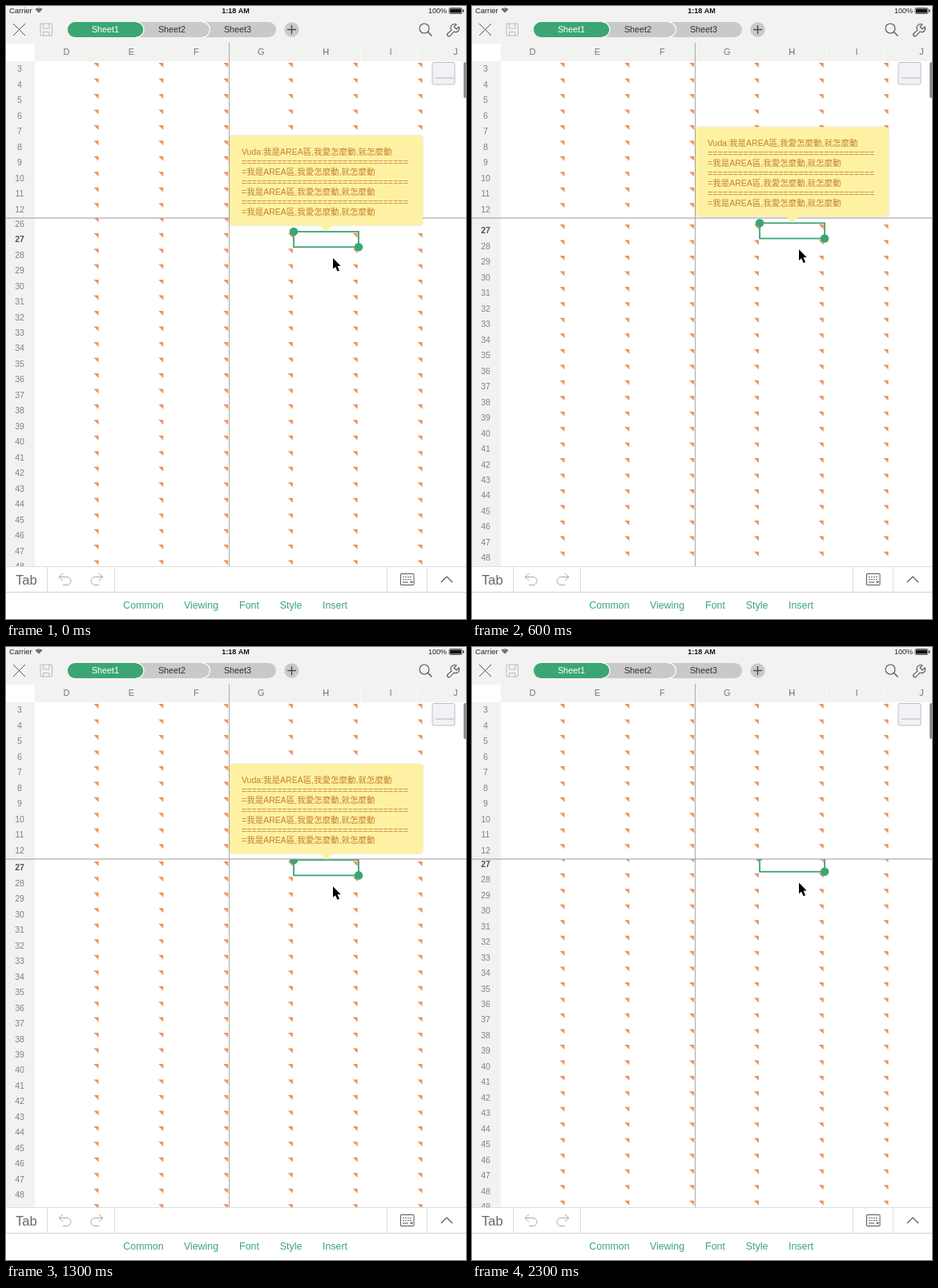
Animation, 574 px wide and 766 px high, one loop 2.4 s. Source, as an HTML page with a canvas:

```html
<!DOCTYPE html>
<html lang="zh-Hant">
<head>
<meta charset="utf-8">
<title>Spreadsheet</title>
<style>
html, body { margin: 0; width: 100%; height: 100%; overflow: hidden; background: #fff; }
canvas { display: block; }
</style>
</head>
<body>
<canvas id="stage" width="574" height="766"></canvas>
<script>
const ctx = document.getElementById('stage').getContext('2d');
const W = 574, LOOP = 2400, STEP = 100;
const PITCH = 19.47, TOP = 69.3, SPLIT = 265, BOTTOM = 700;
const GREEN = '#3ba674', BAR = '#f2f2f1', ORANGE = '#ef915c';
const FONT = '"Liberation Sans", "Noto Sans CJK TC", "Noto Sans CJK", sans-serif';

// [time, top edge of row 27]
const SCROLL = [[0, 282], [200, 279.8], [600, 271.3], [1000, 267.6],
  [1200, 266.2], [1400, 266.2], [2000, 261.6], [LOOP, 261.6]];

const COLUMNS = [...'DEFGHIJ'].map((name, i) => ({ name, x: 75.5 + i * 80.9, right: 115.5 + i * 80.8 }));

function rowTop(t) {
  const i = SCROLL.findIndex(p => p[0] > t);
  const [t0, y0] = SCROLL[i - 1], [t1, y1] = SCROLL[i];
  return y0 + (y1 - y0) * (t - t0) / (t1 - t0);
}

// The note swells a little, then collapses.
function noteScale(t) {
  const p = Math.max(0, (t - 1400) / 413);
  return p >= 1 ? 0 : 1 - (2.70158 * p ** 3 - 1.70158 * p ** 2);
}

function rect(x, y, w, h, color) {
  ctx.fillStyle = color;
  ctx.fillRect(x, y, w, h);
}

function text(s, x, y, size, color, align = 'center', weight = 'normal') {
  ctx.font = `${weight} ${size}px ${FONT}`;
  ctx.textAlign = align;
  ctx.textBaseline = 'alphabetic';
  ctx.fillStyle = color;
  ctx.fillText(s, x, y + size * 0.36);
}

function line(points, color, width = 1) {
  ctx.beginPath();
  points.forEach(([x, y]) => ctx.lineTo(x, y));
  ctx.strokeStyle = color;
  ctx.lineWidth = width;
  ctx.stroke();
}

function poly(points, color) {
  ctx.beginPath();
  points.forEach(([x, y]) => ctx.lineTo(x, y));
  ctx.closePath();
  ctx.fillStyle = color;
  ctx.fill();
}

function round(x, y, w, h, r, color) {
  ctx.beginPath();
  ctx.roundRect(x, y, w, h, r);
  ctx.fillStyle = color;
  ctx.fill();
}

function strokeRound(x, y, w, h, r, color, width = 1) {
  ctx.beginPath();
  ctx.roundRect(x, y, w, h, r);
  ctx.strokeStyle = color;
  ctx.lineWidth = width;
  ctx.stroke();
}

function disc(x, y, r, color) {
  ctx.beginPath();
  ctx.arc(x, y, r, 0, 7);
  ctx.fillStyle = color;
  ctx.fill();
}

function arc(x, y, r, a, b, color, width = 1) {
  ctx.beginPath();
  ctx.arc(x, y, r, a, b);
  ctx.strokeStyle = color;
  ctx.lineWidth = width;
  ctx.stroke();
}

function clipped(y, h, draw) {
  ctx.save();
  ctx.beginPath();
  ctx.rect(0, y, W, h);
  ctx.clip();
  draw();
  ctx.restore();
}

function row(n, y) {
  const active = n === 27;
  text(n, 17, y + 9.4, 10.5, active ? '#555' : '#808080', 'center', active ? 'bold' : 'normal');
  for (const { right } of COLUMNS.slice(0, 6)) {
    poly([[right - 6, y + 1.7], [right, y + 1.7], [right, y + 7.7]], ORANGE);
  }
}

function selection(y) {
  ctx.strokeStyle = GREEN;
  ctx.lineWidth = 1.8;
  ctx.strokeRect(359, y, 81, 19.2);
  disc(359, y, 5.3, GREEN);
  disc(440, y + 19.2, 5.3, GREEN);
}

function grid(y) {
  rect(0, 46, 36, 654, BAR);
  clipped(69, SPLIT - 69, () => {
    for (let n = 3; n <= 12; n++) row(n, TOP + (n - 3) * PITCH);
  });
  clipped(SPLIT, BOTTOM - SPLIT, () => {
    for (let n = 26; n <= 49; n++) row(n, y + (n - 27) * PITCH);
    selection(y);
  });
}

function header() {
  rect(0, 0, W, 69, BAR);
  rect(0, 47, 36, 22, '#fff');
  for (const { name, x } of COLUMNS) text(name, x, 57.5, 11, name === 'H' ? '#666' : '#777');
  rect(442, 47, 1, 22, '#fafafa');
  rect(513, 47, 1, 22, '#fafafa');
  rect(278, 46, 1, 654, '#aaa');
  rect(0, 264.5, W, 1, '#999');
}

function statusBar() {
  text('Carrier', 4, 6, 9.4, '#222', 'left');
  for (const r of [2, 4, 6]) arc(41, 9, r, -2.3, -0.84, '#222', 1.2);
  text('1:18 AM', 286.5, 6, 9, '#111', 'center', 'bold');
  text('100%', 550, 6, 9, '#222', 'right');
  strokeRound(553, 2.5, 16, 7, 1.5, '#333', 0.8);
  rect(554, 3.5, 14, 5, '#111');
  rect(570, 4.5, 1.5, 3, '#333');
}

function toolbar() {
  line([[9, 22], [24, 37]], '#555');
  line([[24, 22], [9, 37]], '#555');

  strokeRound(43, 22, 14.5, 15, 1, '#bbb');
  line([[46.5, 22], [46.5, 28], [54, 28], [54, 22]], '#bbb');
  line([[46.5, 37], [46.5, 32.5], [54, 32.5], [54, 37]], '#bbb');

  round(77, 20, 260, 19, 9.5, '#c9c9c9');
  round(166, 20, 89, 19, [0, 9.5, 9.5, 0], '#c9c9c9');
  arc(245, 29.5, 9.5, -1.57, 1.57, '#fff', 1.2);
  round(77, 20, 95, 19, 9.5, GREEN);
  arc(162.5, 29.5, 9.5, -1.57, 1.57, '#fff', 1.2);
  text('Sheet1', 124, 29.5, 10.8, '#fff');
  text('Sheet2', 207, 29.5, 10.8, '#333');
  text('Sheet3', 289, 29.5, 10.8, '#333');

  disc(356.5, 29.5, 9.2, '#c9c9c9');
  line([[351, 29.5], [362, 29.5]], '#444', 1.3);
  line([[356.5, 24], [356.5, 35]], '#444', 1.3);

  arc(522, 28, 6, 0, 7, '#555', 1.1);
  line([[526.3, 32.3], [531.5, 37.5]], '#555', 1.3);

  ctx.beginPath();
  ctx.moveTo(562, 23);
  ctx.bezierCurveTo(557, 21, 553, 26, 556, 30);
  ctx.lineTo(550.5, 35);
  ctx.quadraticCurveTo(550.5, 38, 553.5, 38);
  ctx.lineTo(559, 32);
  ctx.bezierCurveTo(563, 34, 567, 30, 565, 26);
  ctx.lineTo(562, 29);
  ctx.lineTo(559, 26);
  ctx.closePath();
  ctx.strokeStyle = '#555';
  ctx.lineWidth = 1.1;
  ctx.stroke();
}

function arrow(x, dir) {
  ctx.save();
  ctx.translate(x, 717);
  ctx.scale(dir, 1);
  line([[-3, -8], [-8, -3.5], [-3, 1]], '#aaa');
  line([[-8, -3.5], [2, -3.5]], '#aaa');
  arc(2, 1.5, 5, -1.57, 1.57, '#aaa');
  line([[2, 6.5], [-3, 6.5]], '#aaa');
  ctx.restore();
}

function footer() {
  rect(0, BOTTOM, W, 66, '#fff');
  rect(0, 700, W, 1, '#dedede');
  rect(0, 732, W, 1, '#d2d2d2');
  for (const x of [51, 135, 475, 525]) rect(x, 701, 1, 31, '#dcdcdc');
  text('Tab', 12, 717, 16.5, '#666', 'left');
  arrow(74, 1);
  arrow(113, -1);

  strokeRound(492.5, 709.5, 16.5, 14, 0.5, '#555');
  for (const y of [713, 716]) {
    for (let x = 495; x < 507; x += 3) rect(x, y, 1.8, 1, '#555');
  }
  rect(495, 719.5, 7, 1, '#555');
  poly([[504, 719], [508, 719], [506, 721.5]], '#555');
  line([[543, 720], [550, 713], [557, 720]], '#555', 1.2);

  const menu = { Common: 171.5, Viewing: 243.5, Font: 303.5, Style: 355.5, Insert: 410.5 };
  for (const name in menu) text(name, menu[name], 749, 12.4, GREEN);
}

function sideView() {
  round(532, 70.5, 28, 27.5, 2, '#f1f2f5');
  strokeRound(532, 70.5, 28, 27.5, 2, '#b9bfcd');
  rect(536, 89.5, 23, 1, '#b5b5b5');
  round(571, 70, 4, 45, 2, '#8f8f8f');
}

function note(y, scale) {
  if (scale <= 0) return;
  const body = '我是AREA區,我愛怎麼動,就怎麼動';
  const ink = '#c2802f';
  ctx.save();
  ctx.translate(399.5, y);
  ctx.scale(scale, scale);
  ctx.translate(-399.5, -120);
  strokeRound(279, 0, 241, 112, 4, 'rgba(0,0,0,.07)', 2);
  round(279, 0, 241, 112, 4, '#fff1a3');
  poly([[391, 111.5], [408, 111.5], [399.5, 119.5]], '#fff1a3');
  text('Vuda:' + body, 294, 19.8, 10.5, ink, 'left');
  for (let i = 0; i < 3; i++) {
    const top = 33 + i * 25;
    text('='.repeat(33), 294, top, 10.8, ink, 'left');
    text('=' + body, 294, top + 11.8, 10.5, ink, 'left');
  }
  ctx.restore();
}

function cursor(y) {
  ctx.save();
  ctx.translate(408, y);
  ctx.lineJoin = 'round';
  const shape = [[0, 0], [0, 13.6], [3, 11], [5.6, 16.6], [8, 15.6], [5.5, 10], [9.6, 9.8]];
  line([...shape, shape[0]], '#fff', 2);
  poly(shape, '#000');
  ctx.restore();
}

function draw(now) {
  const t = Math.floor(now % LOOP / STEP) * STEP;
  const y = rowTop(t);
  rect(0, 0, W, 766, '#fff');
  grid(y);
  header();
  statusBar();
  toolbar();
  sideView();
  note(t < 1500 ? y : Math.max(y, SPLIT), noteScale(t));
  footer();
  cursor(y + 33);
}

let start;
function tick(now) {
  start ??= now;
  draw(now - start);
  requestAnimationFrame(tick);
}
draw(0);
requestAnimationFrame(tick);
</script>
</body>
</html>
```
